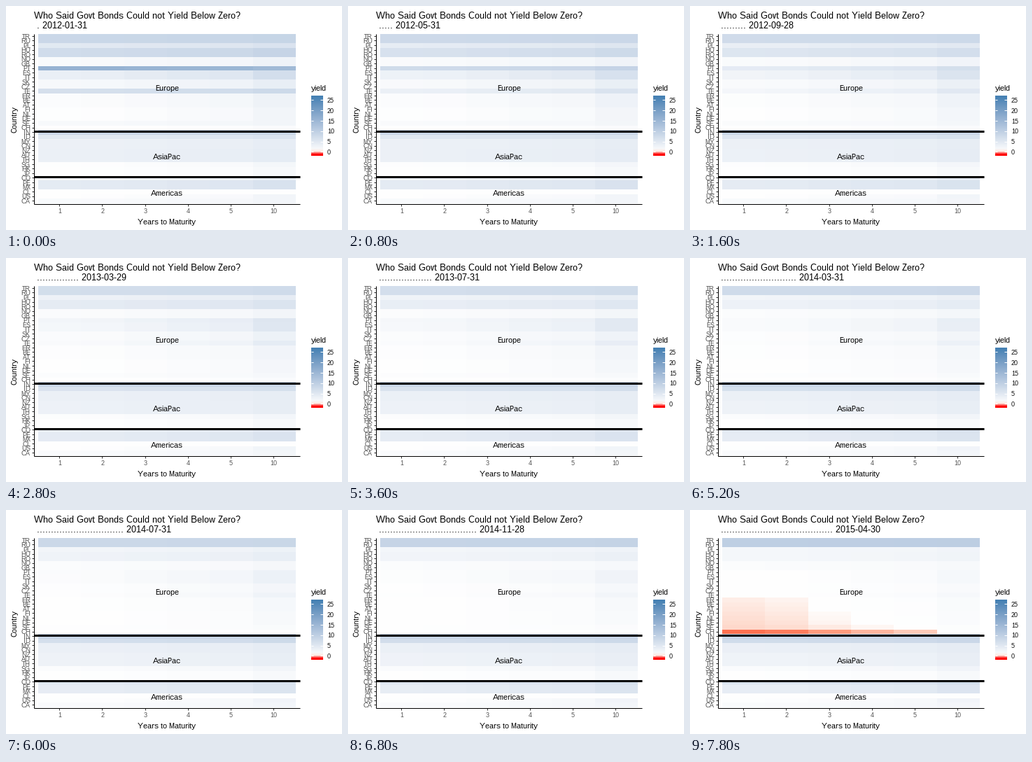
Animation, 480 px wide and 320 px high, one loop 8 s. Source, as a matplotlib script:

```python
import numpy as np
import matplotlib.pyplot as plt
from matplotlib.animation import FuncAnimation

plt.rcParams.update({
    "font.family": "Liberation Sans",
    "text.hinting": "native",
    "text.hinting_factor": 1,
    "text.kerning_factor": 6,
    "toolbar": "None",
})

W, H, DPI = 480, 320, 72
MONTHS, STEP = 40, 200
LOW, HIGH = -1.7, 27.2

# Countries: 1-year yield at the start and the end, extra yield at 10 years
EUROPE = {
    "TR RU": (8.2, 10, 0.5),
    "PL": (4.5, 1.6, 1.2),
    "HU RO": (7.2, 1.6, 1.6),
    "NO GB": (1, 0.6, 1.4),
    "PT ES IT": (3.2, 0, 3.5),
    "SK CZ": (1.3, 0, 2.2),
    "IE": (1.5, 0, 3.3),
    "FR BE AT": (0.6, 0, 2),
    "FI NL DE": (0.2, 0, 1.7),
    "SE": (1.1, 0, 0.9),
    "CH": (0, 0, 0.7),
}
REST = {
    "IN": (8.2, 8.2, 0),
    "ID": (4.7, 7.2, 1),
    "MY CN": (2.9, 3.1, 0.7),
    "NZ AU TH": (3, 2.4, 0.9),
    "SG": (0.2, 0.7, 1.4),
    "HK JP": (0.1, 0.1, 1),
    "CO": (2, 5.5, 1.5),
    "PE MX": (4.1, 3.6, 1.8),
    "CL": (0, 0, 0),
    "US": (0.1, 0.2, 1.9),
    "CA": (1, 0.8, 0.9),
}
SHOCK = {"PT": 13, "IE": 5}
CORE = "FR BE AT FI NL DE SE".split()
CUT = {name: 0.16 + 0.03 * i for i, name in enumerate(CORE)} | {"CH": 1.2}
TERM = np.array([0, 0.06, 0.22, 0.38, 0.5, 1])


def expand(groups):
    return {name: v for names, v in groups.items() for name in names.split()}


NAMES = list(expand(EUROPE)) + list(expand(REST))
START, END, SPREAD = np.array(list((expand(EUROPE) | expand(REST)).values())).T
IN_EUROPE = np.array([name in expand(EUROPE) for name in NAMES])
SHOCKS = np.array([SHOCK.get(name, 0) for name in NAMES])
CUTS = np.array([CUT.get(name, 0) for name in NAMES])


def yields(month):
    t = month / (MONTHS - 1)
    dip = 1 - 0.25 * np.sin(np.pi * t) * IN_EUROPE
    base = (START + (END - START) * t) * dip
    slope = SPREAD * (1 - 0.6 * t * t * IN_EUROPE)
    shock = SHOCKS * np.exp(-month / 4)
    short = base + shock - CUTS * np.clip((month - 35) / 2, 0, 1)
    ten = base + slope + 0.6 * shock
    return short[:, None] + (ten - short)[:, None] * TERM


TO_XYZ = np.array([[0.4124, 0.3576, 0.1805],
                   [0.2126, 0.7152, 0.0722],
                   [0.0193, 0.1192, 0.9505]])
WHITE_XYZ = TO_XYZ.sum(axis=1)


def to_lab(rgb):
    c = np.array(rgb) / 255
    lin = np.where(c > 0.04045, ((c + 0.055) / 1.055) ** 2.4, c / 12.92)
    t = TO_XYZ @ lin / WHITE_XYZ
    f = np.where(t > 0.008856, np.cbrt(t), 7.787 * t + 16 / 116)
    return np.array([116 * f[1] - 16, 500 * (f[0] - f[1]), 200 * (f[1] - f[2])])


def to_rgb(lab):
    fy = (lab[..., 0] + 16) / 116
    f = np.stack([fy + lab[..., 1] / 500, fy, fy - lab[..., 2] / 200], axis=-1)
    t = np.where(f > 0.2069, f ** 3, (f - 16 / 116) / 7.787)
    lin = np.clip(t * WHITE_XYZ @ np.linalg.inv(TO_XYZ).T, 0, 1)
    return np.where(lin > 0.0031308, 1.055 * lin ** (1 / 2.4) - 0.055, 12.92 * lin)


STOPS = [to_lab(c) for c in ((255, 0, 0), (255, 255, 255), (70, 130, 180))]


def fill(value):
    lab = [np.interp(value, (LOW, 0, HIGH), [s[k] for s in STOPS]) for k in range(3)]
    return to_rgb(np.stack(lab, axis=-1))


def caption(month):
    first = (np.datetime64("2012-01") + month + 1).astype("datetime64[D]")
    day = np.busday_offset(first, -1, roll="forward")
    return "." * (month + 1) + f" {day}"


fig = plt.figure(figsize=(W / DPI, H / DPI), dpi=DPI, facecolor="white")
ax = fig.add_axes([0, 0, 1, 1])

LEFT, RIGHT, TOP, BOTTOM = 40.5, 420, 40.5, 283.5
x0, col = 46.1, 61.2
y0, row = 40.2, 6.532


def write(x, y, text, size, ha="left", color="black", **kw):
    return ax.text(x, H - y, text, fontsize=size, ha=ha, va="baseline",
                   color=color, **kw)


def line(xs, ys, width=1, color="black"):
    # Half a pixel back, as snapping rounds up
    ax.plot([x - 0.5 for x in xs], [H - y + 0.5 for y in ys], lw=width,
            color=color, solid_capstyle="butt", zorder=3)


def picture(data, left, right, top, bottom, mode):
    return ax.imshow(data, extent=(left, right, H - bottom, H - top),
                     interpolation=mode, aspect="auto", origin="upper", zorder=1)


tiles = picture(fill(yields(0)), x0, x0 + 6 * col, y0, y0 + 37 * row, "nearest")

# Axes
for i, name in enumerate(NAMES):
    y = y0 + (i + 0.5) * row
    line((LEFT - 3, LEFT), (y, y), color="#333333")
    write(35, round(y + 3.2), name, 9, "right", "#4D4D4D")
for i, label in enumerate(("1", "2", "3", "4", "5", "10")):
    x = x0 + (i + 0.5) * col
    line((x, x), (BOTTOM, BOTTOM + 3), color="#333333")
    write(x, 296, label, 9, "center", "#4D4D4D")
line((LEFT, LEFT), (TOP, BOTTOM))
line((LEFT, RIGHT), (BOTTOM, BOTTOM))
for y in (179.5, 244.5):
    line((LEFT, RIGHT), (y, y), 3)

write(229.5, 312, "Years to Maturity", 11, "center")
write(15, 162, "Country", 11, "center", rotation=90, rotation_mode="anchor")
for label, y in (("Europe", 121), ("AsiaPac", 219), ("Americas", 271)):
    write(230, y, label, 11, "center", zorder=4)

# Legend
write(436, 121, "yield", 11)
BAR_TOP, BAR_BOTTOM = 128, 214
bins = np.linspace(HIGH, LOW, 20)
picture(fill(bins)[:, None, :], 436, 453, BAR_TOP, BAR_BOTTOM, "bilinear")
for v in range(0, 30, 5):
    y = BAR_TOP + (HIGH - v) / (HIGH - LOW) * (BAR_BOTTOM - BAR_TOP)
    for x in (436, 449.6):
        line((x, x + 3.4), (y, y), color="white")
    write(459, round(y + 3.2), str(v), 9)

write(40, 18, "Who Said Govt Bonds Could not Yield Below Zero?", 13)
stamp = write(44, 32, caption(0), 13)

ax.set_xlim(0, W)
ax.set_ylim(0, H)
ax.axis("off")


def draw(month):
    tiles.set_data(fill(yields(month)))
    stamp.set_text(caption(month))
    return tiles, stamp


anim = FuncAnimation(fig, draw, frames=MONTHS, interval=STEP, repeat=True,
                     repeat_delay=0, blit=False)
plt.show()
```
